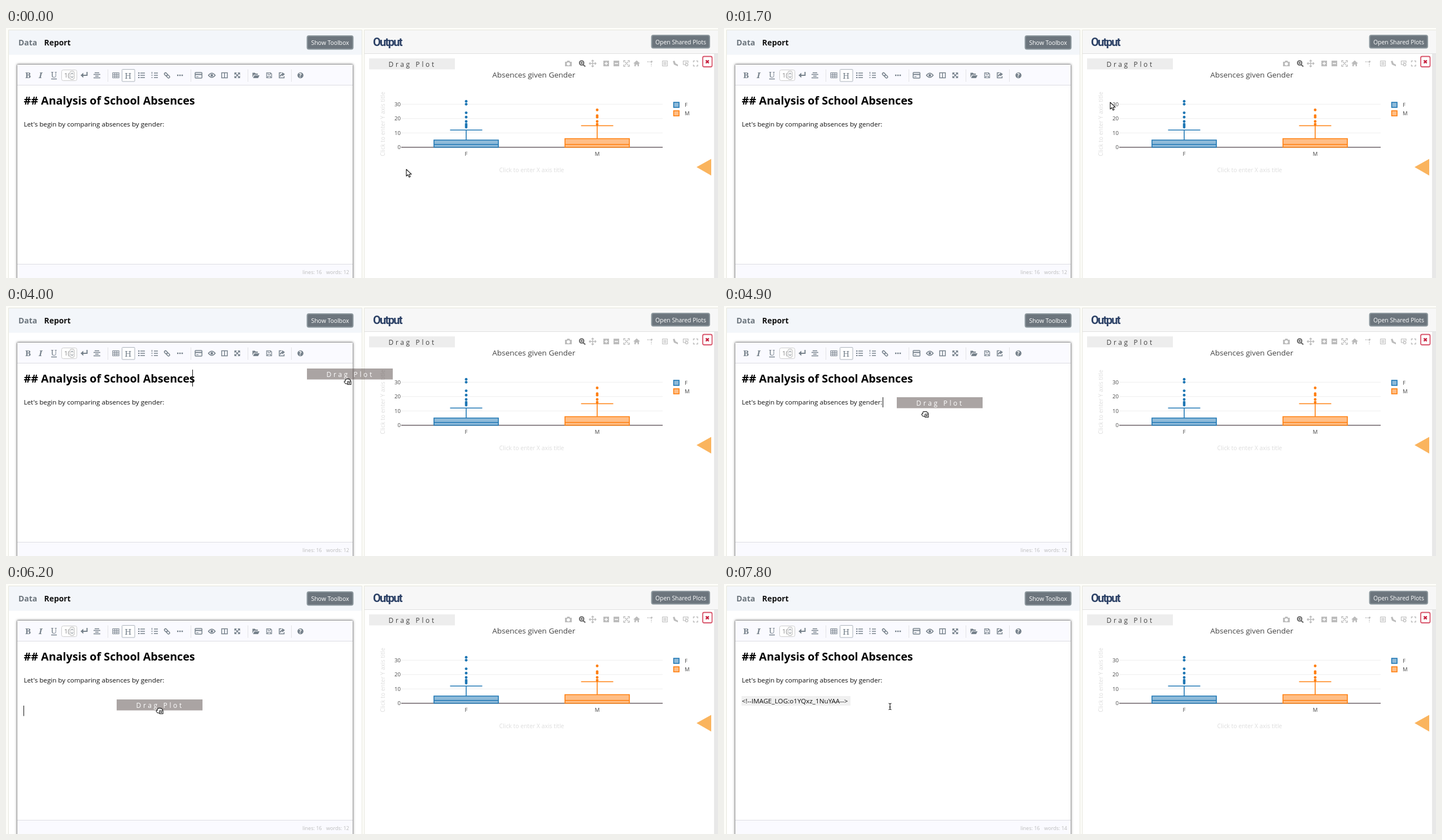
Recreate the animation shown at these times as an HTML page. Size 1261 px wide and 444 px high, loop 8 s.

```html
<!DOCTYPE html>
<html lang="en">
<head>
<meta charset="utf-8">
<title>Drag a plot into a report</title>
<style>
html, body { margin: 0; width: 100%; height: 100%; overflow: hidden; background: #fdfdf9; }
svg { display: block; font-family: "Open Sans", sans-serif; }
text { white-space: pre; }
.mid { text-anchor: middle; }
.btn rect { fill: #6c757d; stroke: #8c979d; stroke-width: 2; }
.btn text { fill: #fff; font-size: 10.4px; text-anchor: middle; }
.drag { font-size: 12px; letter-spacing: 3.65px; }
.tools { fill: none; stroke: #77828c; stroke-width: 1.5; }
.tools .f, .bar .f { fill: currentColor; stroke: none; }
.tools { color: #77828c; }
.tools text { fill: currentColor; stroke: none; font: bold 15px "Noto Serif", serif; }
.bar { fill: none; stroke: #bcbcbc; color: #bcbcbc; stroke-width: 1.4; }
.hint { font-size: 10.4px; fill: #ddd; text-anchor: middle; }
.tick { font-size: 9.6px; fill: #444; }
.cursor { fill: #fff; stroke: #111; stroke-width: 1.1; stroke-linejoin: round; }
</style>
</head>
<body>
<svg width="1261" height="444" viewBox="0 0 1261 444">
  <!-- panels -->
  <path d="M4.500 444V3.500H630.500V444" fill="#fff" stroke="#e6e6dc"/>
  <path d="M5 4H630V47.500H5Z" fill="#f3f6fa"/>
  <path d="M634.500 444V3.500H1262V444" fill="#fff" stroke="#e6e6dc"/>
  <path d="M635 4H1261V45H635Z" fill="#f7f7f7"/>
  <path d="M635 45.500H1261" stroke="#e0e0e0"/>
  <path d="M1254 46H1261V444H1254Z" fill="#e8e8e8"/>
  <g font-weight="bold" font-size="13.900">
    <text x="22" y="31" fill="#6c757d">Data</text>
    <text x="67.500" y="31" fill="#111">Report</text>
  </g>
  <text x="650" y="31.500" fill="#2c4166" style="font:bold condensed 20px Roboto,sans-serif;letter-spacing:-1.7px">Output</text>
  <g class="btn">
    <rect x="533.500" y="14" width="81" height="23.500" rx="3"/><text x="574" y="30">Show Toolbox</text>
    <rect x="1143.500" y="13" width="102.500" height="22.500" rx="3"/><text x="1195" y="28.500">Open Shared Plots</text>
  </g>

  <!-- editor -->
  <rect x="19.500" y="64.500" width="595" height="400" rx="2" fill="#fff" stroke="#999" style="filter:drop-shadow(0 0 2px #999)"/>
  <path d="M20 65H614V101H20ZM20 420H614V444H20Z" fill="#fafaff"/>
  <path d="M20 101.500H614M20 419.500H614" stroke="#dcdce2"/>
  <g class="tools">
    <text x="34" y="89">B</text>
    <text x="58" y="89" font-style="italic" style="font-style:italic">I</text>
    <text x="79.500" y="88" style="font-weight:normal">U</text><path d="M80 90.500H90"/>
    <rect x="98.500" y="74.500" width="27" height="19" rx="3" fill="#fff" stroke="#ccc" stroke-width="1"/>
    <text x="103" y="88" style="font:11px 'Open Sans',sans-serif;fill:#888">1(</text>
    <rect x="113" y="76.500" width="8" height="15" rx="3" fill="#f4f4f4" stroke="#bbb" stroke-width="1"/>
    <path d="M115 82L117 80L119 82M115 86L117 88L119 86" stroke-width="1"/>
    <path d="M143.500 78V84H135" stroke-width="2"/><path class="f" d="M132 84L137 79.500V88.500Z"/>
    <path d="M157 79.500H165M155 82.500H167M158 85.500H164M155 88.500H167"/>
    <path d="M180.500 74V95M327.500 74V95M428.500 74V95M505.500 74V95" stroke="#ccc" stroke-width="1" stroke-dasharray="1 1"/>
    <path d="M189 79.500H200V88.500H189ZM189 82.500H200M189 85.500H200M192.700 79V89M196.300 79V89" stroke-width="1.100"/>
    <rect x="205.500" y="73.500" width="22.500" height="21.500" rx="1" fill="#fff" stroke="#aab2ba" stroke-width="1"/>
    <text x="210.300" y="89.500" style="font-weight:normal">H</text>
    <path d="M238 80H246M238 84H246M238 88H246M262 80H269M262 84H269M262 88H269"/>
    <path d="M234 80H236.500M234 84H236.500M234 88H236.500" stroke-width="2.200"/>
    <path d="M258.500 78V81.500M257 84H260M257 88H260" stroke-width="1.200"/>
    <g transform="rotate(45 285 84)"><rect x="279.500" y="82" width="6" height="4" rx="2"/><rect x="285" y="82" width="6" height="4" rx="2"/></g>
    <path d="M303 84H313.500" stroke-width="2.500" stroke-dasharray="2.500 1.400"/>
    <rect x="335" y="79" width="12" height="10" rx="1"/><path d="M335 82.500H347" stroke-width="2"/><path d="M337 86.500H341" stroke-width="1"/>
    <path d="M358.500 84Q364.500 76.500 370.500 84Q364.500 91.500 358.500 84Z"/><circle class="f" cx="364.500" cy="84" r="2.300"/>
    <path d="M382 79.500H392V88.500H382ZM387 79V89"/>
    <path d="M406 80.500L413 87.500M413 80.500L406 87.500"/>
    <path class="f" d="M404.500 79H409L404.500 83.500ZM414.500 79V83.500L410 79ZM404.500 89V84.500L409 89ZM414.500 89H410L414.500 84.500Z"/>
    <path class="f" d="M436.500 88V79.500H441L442 81H446V83H439ZM437.500 89L440 84H449L446.500 89Z"/>
    <path d="M461.500 79.500H468.500L470.500 81.500V88.500H461.500ZM464 80V82.500H468V80M463.500 88V85.500H468.500V88" stroke-width="1.200"/>
    <path d="M488 79.500H484V88.500H492.500V85.500"/><path d="M486 86Q486.500 82.500 490 82.500" stroke-width="2"/><path class="f" d="M489 78.500L494 82L489 86Z"/>
    <circle class="f" cx="521.500" cy="84" r="5.300"/><text x="518.800" y="88" style="font:bold 10px 'Open Sans',sans-serif;fill:#fff">?</text>
  </g>
  <text x="31.500" y="135.500" font-size="19.700" font-weight="bold">## Analysis of School Absences</text>
  <g font-size="11.650" fill="#111">
    <text x="31.500" y="175">Let's begin by comparing absences by gender:</text>
    <g id="log">
      <rect x="31" y="199" width="193" height="17" fill="#f0f0f0"/>
      <text x="31.500" y="211.500">&lt;!--IMAGE_LOG:o1YQxz_1NuYAA--&gt;</text>
    </g>
  </g>
  <g font-size="9" fill="#bbb"><text x="525" y="436.500">lines: 16</text><text id="words" x="567" y="436.500"></text></g>

  <!-- plot -->
  <rect id="button" x="643" y="54" width="152" height="19.500"/>
  <text id="label" class="drag" x="677.500" y="69">Drag Plot</text>
  <g class="bar">
    <path class="f" fill-rule="evenodd" d="M990 60H993L994 58H998L999 60H1002V68H990ZM996 61A2.800 2.800 0 1 0 996 66.600A2.800 2.800 0 1 0 996 61Z"/>
    <g stroke="#666"><circle cx="1019.500" cy="62" r="3.800" stroke-width="2"/><path d="M1022 65L1026 68.500" stroke-width="2.200"/><path d="M1017.500 62H1021.500M1019.500 60V64"/></g>
    <path d="M1033 63H1045M1039 57V69M1037 59L1039 57L1041 59M1037 67L1039 69L1041 67M1035 61L1033 63L1035 65M1043 61L1045 63L1043 65"/>
    <path class="f" d="M1058 58H1068V68H1058ZM1076 58H1086V68H1076Z"/>
    <path d="M1060 63H1066M1063 60V66M1078 63H1084" stroke="#fff"/>
    <path d="M1094 61V58H1097M1101 58H1104V61M1104 65V68H1101M1097 68H1094V65M1096 60L1102 66M1102 60L1096 66"/>
    <path class="f" d="M1111 63L1117 57.500L1123 63H1121V68H1118.500V65H1115.500V68H1113V63Z"/>
    <path d="M1136 60H1143V68" stroke-dasharray="2 1.500"/><circle class="f" cx="1143.500" cy="59.500" r="1.500"/>
    <path d="M1162.500 58.500H1171.500V67.500H1162.500ZM1164 61H1170M1164 63H1170M1164 65H1170" stroke-width="1"/>
    <path class="f" d="M1181 59L1184 58L1186 63L1190 65V68L1183 65Z"/>
    <path d="M1208 62V58.500H1199.500V65H1203M1202 61H1206" stroke-width="1.200"/><circle cx="1205.500" cy="65" r="2.300" stroke-width="1.200"/>
    <path d="M1217.500 61V58.500H1220M1222.500 58.500H1225V61M1225 65V67.500H1222.500M1220 67.500H1217.500V65"/>
  </g>
  <rect x="1234" y="50.500" width="16.500" height="18.500" rx="2.500" fill="#fff" stroke="#d8546a" stroke-width="1.800"/>
  <path d="M1239.500 57.300L1244.700 62.500M1244.700 57.300L1239.500 62.500" stroke="#c72340" stroke-width="2.400"/>
  <text class="mid" x="934.700" y="88" font-size="13.500" fill="#444">Absences given Gender</text>
  <text class="hint" x="931" y="256">Click to enter X axis title</text>
  <text class="hint" transform="translate(671 170.500) rotate(-90)">Click to enter Y axis title</text>
  <g id="plot"></g>
  <path d="M1223 247L1249 232.500V262Z" fill="#fab45e"/>

  <!-- moving parts -->
  <path id="caret" stroke="#111"/>
  <g id="ghost" opacity=".5">
    <rect width="152" height="19.500" fill="#584b49"/><text class="drag" x="34.500" y="15" fill="#fff">Drag Plot</text>
  </g>
  <g class="cursor">
    <path id="arrow" d="M0 0V12L2.800 9.500L5 14L7 13L5 8.700H9Z"/>
    <path id="hand" d="M-5 -4Q-4 -6 -2.500 -4L-1 -1.500V-2.500H3Q5.500 -2 5 1.500L4 5H-1.500L-5 1Q-5 -.500 -3 .500L-2 1Z"/>
    <g id="grab"><path d="M-3.500 4L-6 1Q-6 -1 -4 -.500V-3Q-3 -5 -1.500 -4Q0 -5.500 1.500 -4Q3 -5 4 -3Q6 -3 5.500 0L4 4Z"/><path d="M0 0H6V5.500H0ZM1.500 2.700H4.500M3 1.200V4.200"/></g>
    <path id="beam" fill="none" d="M-2.500 -5.500Q0 -5.500 0 -4Q0 -5.500 2.500 -5.500M0 -4V4M-2.500 5.500Q0 5.500 0 4Q0 5.500 2.500 5.500M-1.500 1H1.500"/>
  </g>
</svg>
<script>
const $ = id => document.getElementById(id);
const yOf = v => 211.8 - 2.55 * v;

function boxPlot(name, x, color, q3, whisker, outliers, legendY) {
  const dots = outliers.map(v => `<circle cx="${x}" cy="${yOf(v)}" r="2.4" fill="${color}" stroke="none"/>`).join('');
  return `<g stroke="${color}" stroke-width="1.6" fill="none">
    <path d="M${x - 57} ${yOf(0)}V${yOf(q3)}H${x + 57}V${yOf(0)}Z" fill="${color}" fill-opacity=".5"/>
    <path d="M${x - 57} ${yOf(2)}H${x + 57}M${x} ${yOf(q3)}V${yOf(whisker)}M${x - 28.5} ${yOf(whisker)}H${x + 28.5}"/>
    <rect x="1182.500" y="${legendY - 4.5}" width="9.500" height="9" fill="${color}" fill-opacity=".5"/>${dots}</g>
    <text class="tick mid" x="${x}" y="227">${name}</text>
    <text class="tick" x="1202" y="${legendY + 3.5}">${name}</text>`;
}

$('plot').innerHTML = [0, 10, 20, 30].map(v => `
  <path d="M700 ${yOf(v)}H1163" stroke="${v ? '#eee' : '#6a6066'}" stroke-width="${v ? 1 : 1.5}"/>
  <text class="tick" x="699" y="${yOf(v) + 3.5}" text-anchor="end">${v}</text>`).join('') +
  boxPlot('F', 815, '#1f77b4', 5, 12, [14, 15, 16, 18, 21, 24, 30, 32], 136.5) +
  boxPlot('M', 1047, '#ff7f0e', 6, 15, [16, 18, 21, 22, 26], 151.5);

// time, ghost x and y, pointer x and y, caret x, top and height
const drags = [
  [4000, 533, 111, 605, 134, 330.5, 113, 30],
  [4200, 528, 116, 600, 138],
  [4500, 452, 143, 512, 169, 31.5, 144, 18],
  [4900, 306, 162, 356, 192, 281.5, 162, 18],
  [5100, 252, 184, 314, 211, 31.5, 198, 18],
  [5400, 210, 191, 282, 212, 31.5, 198, 18],
  [5600, 203, 193, 276, 212, 31.5, 198, 18],
  [5800, 198, 203, 272, 225, 31.5, 216, 18.5],
  [6200, 196, 205, 272, 225, 31.5, 216, 18.5],
  [6500, 196, 202, 272, 222, 31.5, 216, 18.5],
  [6700, 196, 195, 272, 215, 31.5, 198, 18],
];

function approach(t) {
  const mix = (x0, y0, x1, y1, p) => [x0 + (x1 - x0) * p, y0 + (y1 - y0) * p];
  if (t < 700) return [709, 251];
  if (t < 1500) return mix(709, 251, 674, 168, ((t - 600) / 900) ** 2);
  if (t < 1700) return mix(674, 168, 684, 132, (t - 1500) / 200);
  const left = 1 - Math.min(1, (t - 1700) / 700);
  return mix(684, 132, 714, 70, 1 - left * left);
}

const show = (id, on) => $(id).style.display = on ? '' : 'none';
const place = (id, x, y) => $(id).setAttribute('transform', `translate(${x} ${y})`);

function draw() {
  const t = Math.floor(performance.now() % 8000 / 100) * 100;
  const dropped = t >= 7200;
  const drag = !dropped && drags.findLast(d => d[0] <= t);
  let [x, y] = approach(t);
  const hover = t < 4000 && y < 74;
  let pointer = hover ? 'hand' : 'arrow';
  if (t >= 3800) [pointer, x, y] = ['grab', 748, 72];
  if (drag) [x, y] = drag.slice(3);
  if (dropped) [pointer, x, y] = t < 7800 ? ['beam', 271.5, 212] : ['beam', 294, 217.5];

  for (const id of ['arrow', 'hand', 'grab', 'beam']) show(id, id === pointer);
  place(pointer, x, y);
  $('button').setAttribute('fill', hover ? '#584b49' : '#ededed');
  $('label').setAttribute('fill', hover ? '#fff' : '#444');
  show('ghost', drag);
  show('caret', drag && drag[5]);
  if (drag) {
    place('ghost', drag[1], drag[2]);
    if (drag[5]) $('caret').setAttribute('d', `M${drag[5]} ${drag[6]}v${drag[7]}`);
  }
  show('log', dropped);
  $('words').textContent = `words: ${dropped ? 14 : 12}`;
  requestAnimationFrame(draw);
}
draw();
</script>
</body>
</html>
```
